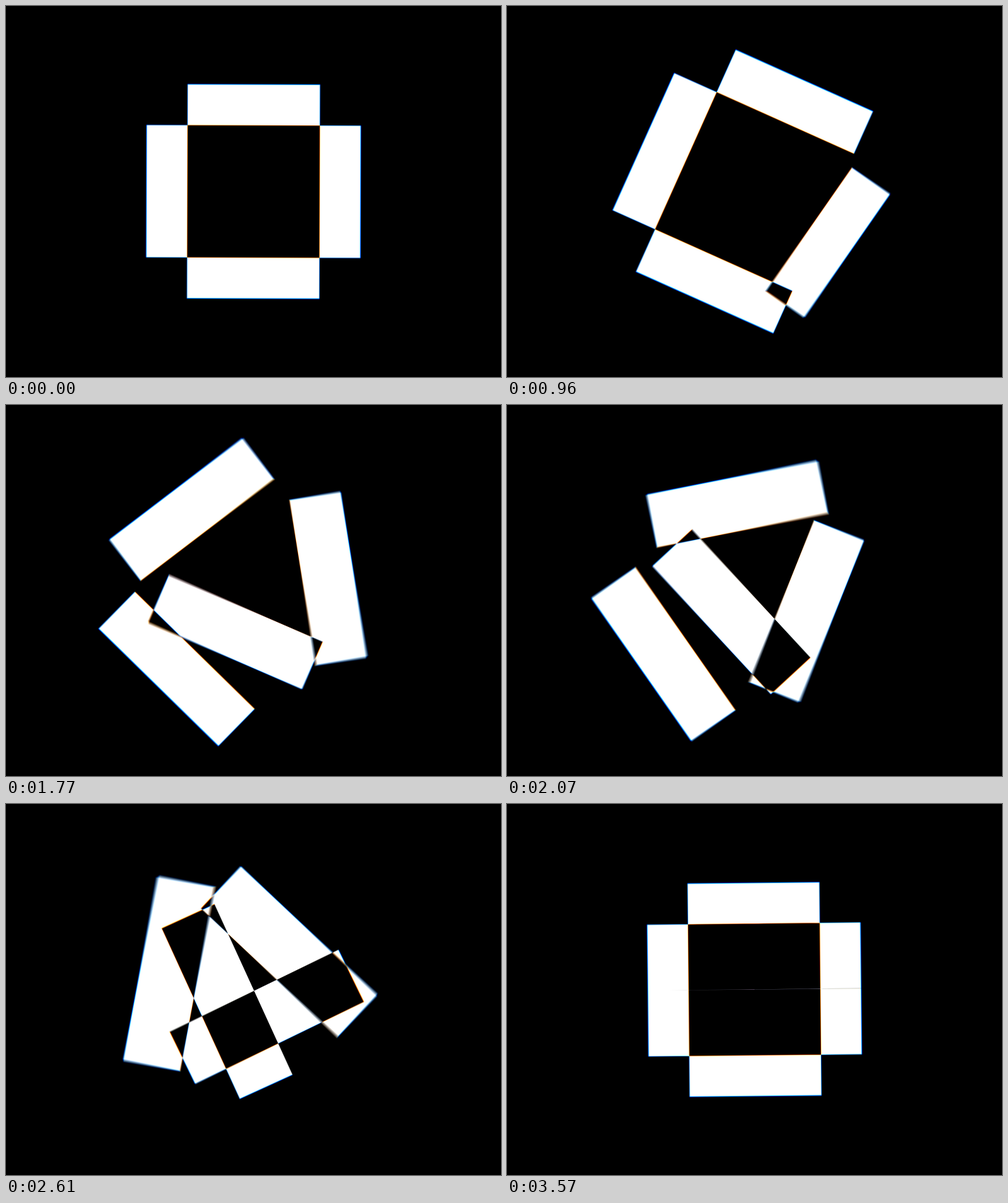
These frames come from a looping animation (700x525 px, 3.6 s). An HTML page with a canvas:

```html
<!DOCTYPE html>
<html lang="en">
<head>
<meta charset="utf-8">
<title>Golden bars</title>
<style>
  html, body { margin: 0; width: 100%; height: 100%; overflow: hidden; background: #000; }
  canvas { display: block; }
</style>
</head>
<body>
<canvas id="stage" width="700" height="525"></canvas>
<script>
const ctx = document.getElementById('stage').getContext('2d');
const WIDTH = 700, HEIGHT = 525;
const LOOP = 3600, STEP = 30;
const PHI = (1 + Math.sqrt(5)) / 2;
const LENGTH = 187, THICKNESS = LENGTH / (2 * PHI);

// Motion blur: several exposures added up within each step.
const SAMPLES = 5, SHUTTER = 0.6;
const LEVEL = 255 / SAMPLES;

// Colour fringes: each channel is magnified slightly differently.
const CHANNELS = [
  { color: `rgb(${LEVEL},0,0)`, scale: 0.996 },
  { color: `rgb(0,${LEVEL},0)`, scale: 1 },
  { color: `rgb(0,0,${LEVEL})`, scale: 1.004 }
];

const clamp = x => Math.min(1, Math.max(0, x));
const smooth = x => x * x * (3 - 2 * x);

function addBar(index, t, scale) {
  const p = smooth(clamp(2.1 * t - 0.35 - 0.25 * index));
  const quarterTurns = t - index + p;
  const radius = THICKNESS / 2 + (1 - p) * LENGTH / 2;
  ctx.setTransform(scale, 0, 0, scale, WIDTH / 2, HEIGHT / 2);
  ctx.rotate(quarterTurns * Math.PI / 2);
  ctx.rect(radius - THICKNESS / 2, -LENGTH / 2, THICKNESS, LENGTH);
}

function expose(t) {
  const zoom = PHI ** t;
  for (const { color, scale } of CHANNELS) {
    ctx.beginPath();
    for (let i = 0; i < 4; i++) addBar(i, t, zoom * scale);
    ctx.fillStyle = color;
    ctx.fill('evenodd');
  }
}

function draw(time) {
  const start = Math.floor((time % LOOP) / STEP + 0.001) * STEP;
  ctx.resetTransform();
  ctx.globalCompositeOperation = 'source-over';
  ctx.fillStyle = '#000';
  ctx.fillRect(0, 0, WIDTH, HEIGHT);
  ctx.globalCompositeOperation = 'lighter';
  for (let s = 0; s < SAMPLES; s++) {
    expose((start + STEP * SHUTTER * s / SAMPLES) % LOOP / LOOP);
  }
}

function tick() {
  draw(performance.now());
  requestAnimationFrame(tick);
}
tick();
</script>
</body>
</html>
```
